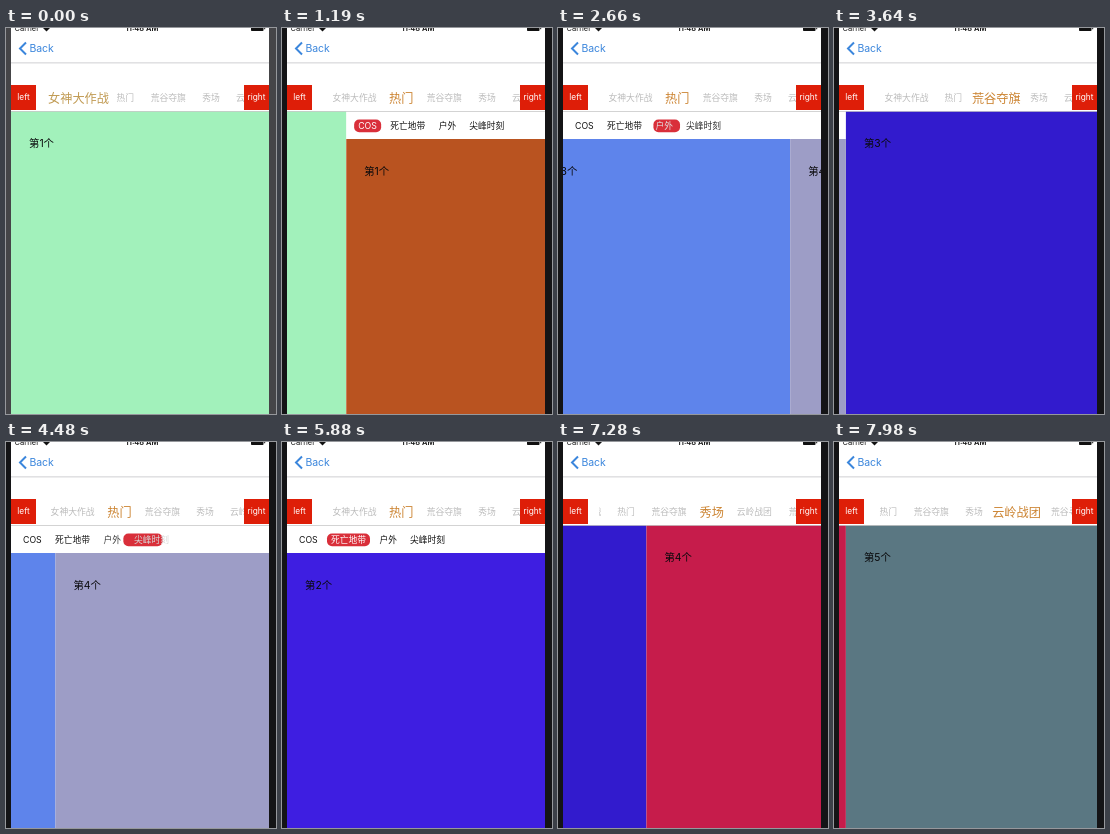
These frames come from a looping animation (270 by 386 pixels, 8 s). An HTML page:

```html
<!DOCTYPE html>
<html lang="zh-CN">
<head>
<meta charset="utf-8">
<title>Nested tab pages</title>
<style>
  html, body { margin: 0; width: 100%; height: 100%; overflow: hidden; background: #141416; }
  svg { display: block; width: 270px; height: 386px; }
  text { font-family: Inter, "Noto Sans CJK SC", "Noto Sans CJK", sans-serif; }
  .mid { text-anchor: middle; }
  .page text { font-size: 10.4px; fill: #0a0a0c; }
  .tab { font-size: 8.75px; }
  .btn { font-size: 8.3px; fill: #fff; }
  .status { font-size: 7.5px; fill: #111; }
  #frame { animation: dim 8s step-end infinite; }
  @keyframes dim { 0% { fill: #454548; } 11.375% { fill: #141416; } }
</style>
</head>
<body>
<svg viewBox="0 0 270 386" xmlns="http://www.w3.org/2000/svg">
  <defs>
    <clipPath id="screen"><rect x="5" y="0" width="258" height="386"/></clipPath>
    <clipPath id="strip"><rect x="41" y="50" width="197" height="33"/></clipPath>
    <clipPath id="inner"><rect x="5" y="111" width="258" height="275"/></clipPath>
  </defs>
  <rect id="frame" width="270" height="386"/>
  <g clip-path="url(#screen)">
    <rect x="5" width="258" height="386" fill="#fff"/>
    <g id="pages"></g>
    <rect x="5" y="34.5" width="258" height="0.8" fill="#c4c4c8"/>
    <rect x="5" y="83" width="258" height="0.8" fill="#c8c8c8"/>

    <text class="status" x="8.5" y="3.4">Carrier</text>
    <path d="M37 0H44L40.5 3.6Z" fill="#111"/>
    <text class="status mid" x="136" y="3.4" font-weight="600">11:48 AM</text>
    <path d="M245 0H257.5V2.2Q257.5 3 256.7 3H245.8Q245 3 245 2.2ZM258.2 0H259.2V1.2H258.2Z" fill="#111"/>

    <path d="M20 14.5L14 20.5L20 26.5" fill="none" stroke="#3b86dc" stroke-width="2"/>
    <text x="23.5" y="24.3" font-size="10.5" letter-spacing="-0.1" fill="#3b86dc">Back</text>

    <g clip-path="url(#strip)"><g id="titles"></g></g>
    <path d="M5 57H30V82H5ZM238 57H263V82H238Z" fill="#de1e08"/>
    <text class="btn mid" x="17.5" y="72.3">left</text>
    <text class="btn mid" x="250.5" y="72.3">right</text>
  </g>
</svg>
<script>
const NS = 'http://www.w3.org/2000/svg';
const WIDTH = 258, LEFT = 5, LOOP = 8000;
const byId = id => document.getElementById(id);

function add(parent, tag, attrs, text) {
  const el = document.createElementNS(NS, tag);
  for (const k in attrs) el.setAttribute(k, attrs[k]);
  if (text) el.textContent = text;
  parent.append(el);
  return el;
}

function addPage(parent, index, top, color) {
  const g = add(parent, 'g', { class: 'page', transform: `translate(${index * WIDTH} 0)` });
  add(g, 'rect', { x: LEFT, y: top, width: WIDTH, height: 386 - top, fill: color });
  add(g, 'text', { x: 23, y: top + 36 }, `第${index + 1}个`);
}

const pages = byId('pages');
const PAGE_COLORS = ['#a2f1bb', null, '#321bcd', '#c61c4b', '#5a7782'];
PAGE_COLORS.forEach((c, i) => c && addPage(pages, i, 83, c));

// The second page holds its own tab bar and pager.
const nested = add(pages, 'g', { transform: `translate(${WIDTH} 0)` });
const viewport = add(nested, 'g', { 'clip-path': 'url(#inner)' });
const subPages = add(viewport, 'g', {});
['#b95320', '#3e1ee1', '#5e84eb', '#9d9dc6'].forEach((c, i) => addPage(subPages, i, 111, c));

const pill = add(nested, 'rect', { y: 91.5, height: 12.8, rx: 5, fill: '#d92f3a' });
const TABS = [['COS', 17, 36], ['死亡地带', 49, 84], ['户外', 97.5, 115], ['尖峰时刻', 128, 163]];
const tabs = TABS.map(([name, x]) => add(nested, 'text', { class: 'tab', x, y: 101.2 }, name));

const TITLES = [['女神大作战', 72.5], ['热门', 119.3], ['荒谷夺旗', 162.3],
                ['秀场', 205], ['云岭战团', 247.5], ['荒谷寻踪', 299.5]];
const titles = TITLES.map(([name, x]) => add(byId('titles'), 'text', { class: 'mid', x }, name));

// Moves: [start, end, target value]
const OUTER = [[850, 1620, 1], [3256, 3816, 2], [3886, 4380, 1],
               [6230, 6790, 2], [7070, 7620, 3], [7620, 8145, 4]];
const INNER = [[1750, 2170, 1], [2170, 2590, 2], [2597, 3157, 3], [4400, 4970, 2], [5250, 5530, 1]];
const STRIP = [[3816, 4050, 22.5], [4380, 4620, 0], [6500, 6790, 22.5], [7070, 7620, 65]];

const lerp = (a, b, p) => a + (b - a) * p;

// Quick flick with a long settling tail
function ease(t) {
  const q = 1 - (1 - t) ** 2;
  return q * q * (3 - 2 * q);
}

function valueAt(moves, t) {
  let v = 0;
  for (const [start, end, target] of moves) {
    if (t < start) break;
    v = lerp(v, target, ease(Math.min(1, (t - start) / (end - start))));
  }
  return v;
}

const shift = (el, x) => el.setAttribute('transform', `translate(${-x} 0)`);

function drawTabs(pos) {
  const i = Math.min(2, Math.floor(pos)), p = (pos - i) ** 1.3;
  const x = lerp(TABS[i][1], TABS[i + 1][1], p) - 4;
  const end = lerp(TABS[i][2], TABS[i + 1][2], p) + 4;
  pill.setAttribute('x', x);
  pill.setAttribute('width', end - x);
  tabs.forEach((el, n) => {
    const v = Math.round(lerp(20, 255, Math.max(0, 1 - Math.abs(pos - n))));
    el.setAttribute('fill', `rgb(${v},${v},${v})`);
  });
}

function drawTitles(active) {
  titles.forEach((el, n) => {
    const size = n === active ? 12.2 : 8.8;
    el.setAttribute('font-size', size);
    el.setAttribute('y', 70 + size * 0.38);
    el.setAttribute('fill', n !== active ? '#bcbcbc' : n ? '#cc8432' : '#c09a52');
  });
}

function draw(t) {
  const outer = valueAt(OUTER, t), inner = valueAt(INNER, t);
  shift(pages, outer * WIDTH);
  shift(subPages, inner * WIDTH);
  shift(byId('titles'), valueAt(STRIP, t));
  drawTabs(inner);
  drawTitles(Math.round(outer));
}

function tick() {
  draw(performance.now() % LOOP);
  requestAnimationFrame(tick);
}
tick();
</script>
</body>
</html>
```
